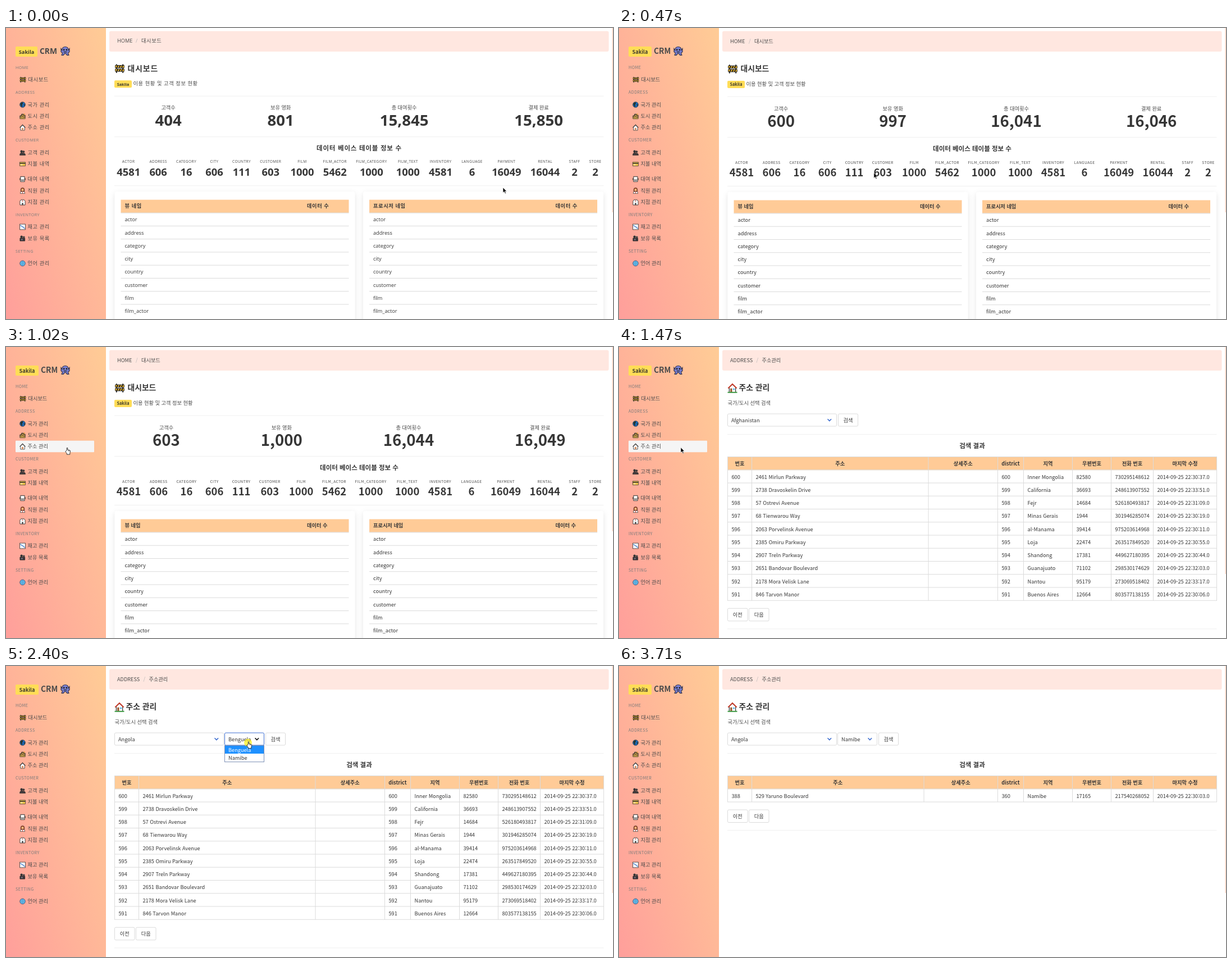
Write an HTML page that moves like this. It is 1081 px wide and 518 px high and loops after 3770 ms.

```html
<!DOCTYPE html>
<html lang="ko">
<head>
<meta charset="utf-8">
<title>Sakila CRM</title>
<style>
html, body { margin: 0; width: 100%; height: 100%; overflow: hidden; background: #fff; }
#side { position: absolute; left: 0; top: 0; width: 177.5px; height: 518px; background: linear-gradient(75deg, #ff9f9b, #ffcc96); }
svg { position: absolute; left: 0; top: 0; font: 9.2px 'Noto Sans CJK KR', 'Noto Sans CJK', sans-serif; }
.early { font-family: 'Open Sans', 'Noto Sans CJK KR', sans-serif; }
.early .ko { letter-spacing: .07em; }
.card { filter: drop-shadow(0 3px 5px rgba(10, 10, 10, .1)); }
.level { display: flex; text-align: center; color: #363636; white-space: nowrap; }
.level > div { flex: 1 0 auto; }
.level > div + div { margin-left: 7.9px; }
.level b, .level i { display: block; }
.level i { font-style: normal; color: #4a4a4a; line-height: 14px; }
.level b { font-size: 27.6px; line-height: 29.5px; }
.small i { font-size: 6.57px; letter-spacing: .4px; line-height: 10px; }
.small b { font-size: 18.4px; line-height: 25.2px; }
</style>
</head>
<body>
<div id="side"></div>
<svg id="stage" width="1081" height="518" viewBox="0 0 1081 518"></svg>
<script>
const LOOP = 3770, ORANGE = '#ffcb97', GREY = '#dbdbdb', BLUE = '#3f6fd1';
const stage = document.getElementById('stage');
const find = id => document.getElementById(id);

// y is the visual middle of the text
function text(x, y, str, o = {}) {
  const size = o.size || 9.2;
  return `<text x="${x}" y="${y + size * .36}" font-size="${size}" fill="${o.fill || '#4a4a4a'}"
    font-weight="${o.weight || 400}" text-anchor="${o.anchor || 'start'}"
    ${o.spacing ? `letter-spacing="${o.spacing}"` : ''}
    class="${/[가-힣]/.test(str) ? 'ko' : ''}">${str}</text>`;
}
const bold = (x, y, str, size, anchor) => text(x, y, str, { size, anchor, weight: 700, fill: '#363636' });
const rect = (x, y, w, h, fill, more = '') => `<rect x="${x}" y="${y}" width="${w}" height="${h}" fill="${fill}" ${more}/>`;
const path = (d, stroke, width = 1, fill = 'none') => `<path d="${d}" stroke="${stroke}" stroke-width="${width}" fill="${fill}"/>`;
const rule = (y, x = 193, end = 1064.5, color = '#f0f0f0') => path(`M${x} ${y}H${end}`, color);
const group = (id, body, more = '') => `<g id="${id}" ${more}>${body}</g>`;

// Icons live in a 12 by 12 box
const house = (wall, roof, extra = '') =>
  path('M2 5v6.5h8V5L6 1.5z', '#222', .8, wall) + path('M.6 6.4 6 1l5.4 5.4', roof, 1.4) + extra;
const icons = {
  barrier: path('M2 .5v11M10 .5v11', '#333', 1.5) + path('M.5 2h11v3H.5zM.5 6.5h11v3H.5z', '#222', .7, '#ffc52e') +
    path('M2 5l2-3M5 5l2-3M8 5l2-3M2 9.5l2-3M5 9.5l2-3M8 9.5l2-3', '#222', 1.3),
  globe: '<circle cx="6" cy="6" r="5.3" fill="#1c6fc4" stroke="#222" stroke-width=".8"/>' +
    path('M2 3l4-2 1 3-2 2 1 3-2 1-2-4zM8 5l3 1-2 3z', 'none', 0, '#26352f'),
  city: path('M1 11V5h3V2h4v2h3v7z', '#222', 1, '#8b6b3c') + path('M2 7h2M5 4h2M8 6h2M5 8h2M1 10h10', '#f5cd52', 1.1) +
    '<circle cx="9.5" cy="2" r="1.3" fill="#e8a33d"/>',
  house: house('#fff', '#333', rect(4.5, 7, 3, 4, '#d58b5b')),
  home: house('#fff', '#c9402f', rect(3.3, 6.5, 2.3, 5, '#9a5b32') + rect(6.8, 6.5, 2, 2, '#58b3e8') +
    path('M0 11.5h12', '#3f9d45', 1.4)),
  people: '<circle cx="4" cy="3.5" r="2.4" fill="#333"/><circle cx="8" cy="4.2" r="2.2" fill="#443b3a"/>' +
    path('M.5 11q0-5 4-5 2 0 3 1 4-.5 4 4z', '#222', .6, '#40393a'),
  card: path('M.5 2.5h11v7.5H.5z', '#333', .8, '#f4c84b') + rect(.5, 4, 11, 1.7, '#333') + rect(2, 7.3, 4, 1, '#fff'),
  rental: path('M2 1h8v10H2z', '#333', 1, '#e9e5e2') + path('M1 4v4M11 4v4M3 8h6', '#333', 1.3) + rect(3.5, 2.5, 5, 3, '#fff'),
  staff: path('M2.5 8V4q0-3.5 3.5-3.5T9.5 4v4z', '#222', .7, '#b8562c') + '<circle cx="6" cy="4.5" r="2" fill="#f8ca8e"/>' +
    path('M1.5 11.5q0-4 4.5-4t4.5 4z', '#222', .7, '#fff') + rect(5.3, 8, 1.4, 3, '#d54b3e'),
  store: path('M1 11.5V4l2-2.5h6L11 4v7.5z', '#222', .9, '#fff') + rect(4.5, 7.5, 3, 4, '#555') + rect(5, 3, 2, 2, '#d85d50'),
  chart: rect(.7, .7, 10.6, 10.6, '#fff', 'stroke="#333" stroke-width=".9"') +
    path('M1 4h10M1 8h10M4 1v10M8 1v10', '#bcd', .4) + path('M1.5 3l3 2 2 1 4 3.5', '#3272c9', 1.2),
  camera: '<circle cx="4" cy="3" r="2.4" fill="#333"/><circle cx="8.5" cy="3.5" r="2" fill="#444"/>' +
    path('M1 5.5h9.5v5.5H1z', '#222', .8, '#38343a') + rect(3, 7, 3.5, 2.5, '#77707a'),
  net: '<circle cx="6" cy="6" r="5.2" fill="#6bc8f4" stroke="#236" stroke-width=".8"/>' +
    path('M1 6h10M6 1v10M2 3.5q4 2 8 0M2 8.5q4-2 8 0M6 1q-5 5 0 10M6 1q5 5 0 10', '#4889bd', .5),
  monster: path('M2 5q0-4.3 4-4.3T10 5l1.3-2v4L9.5 8.5l1 2.7H8.2L7 9.3H5l-1.2 1.9H1.5l1-2.7L.7 7V3z', '#30304a', .8, '#7b83d6') +
    rect(3.5, 3.5, 1.7, 2, '#222') + rect(6.8, 3.5, 1.7, 2, '#222') + path('M4 7.2h4', '#222', 1)
};
const icon = (name, x, y, size = 11) =>
  `<g transform="translate(${x} ${y - size / 2}) scale(${size / 12})">${icons[name]}</g>`;

const menu = [
  ['HOME', 70], ['ADDRESS', 114.5], ['CUSTOMER', 199.5], ['INVENTORY', 332], ['SETTING', 397]
];
const links = [
  ['barrier', '대시보드', 92], ['globe', '국가 관리', 136.5], ['city', '도시 관리', 157], ['house', '주소 관리', 177],
  ['people', '고객 관리', 222], ['card', '지불 내역', 242], ['rental', '대여 내역', 269], ['staff', '직원 관리', 289.5],
  ['store', '지점 관리', 310], ['chart', '재고 관리', 354], ['camera', '보유 목록', 374.5], ['net', '언어 관리', 419]
];
const badge = (x, y, w, h, size) => rect(x, y, w, h, '#ffdd57', 'rx="2"') +
  text(x + w / 2, y + h / 2 + .3, 'Sakila', { size, anchor: 'middle', weight: 700, fill: '#3d3a2c' });
const brand = (w, x) => badge(17, 33, w, 18, 9.2) + text(x, 41, 'CRM', { size: 13.8, weight: 700 });
const sidebar = rect(17, 0, 140, 20.5, '#f5f5f5', 'id="hover" rx="1"') +
  group('brandEarly', brand(39, 60)) + group('brandLate', brand(41, 62)) + icon('monster', 97, 41, 17) +
  menu.map(([s, y]) => text(17, y, s, { size: 7.2, spacing: .45, fill: '#7a7a7a' })).join('') +
  links.map(([i, s, y]) => icon(i, i === 'barrier' ? 24.5 : 24, y) + text(i === 'barrier' ? 39.5 : 38.5, y, s)).join('');

const crumbs = (a, b, slash, x) => text(198, 24, a) + text(slash, 24, '/', { fill: '#b5b5b5' }) + text(x, 24, b);
const level = (y, kind, items) => `<foreignObject x="193" y="${y}" width="871.5" height="50"><div class="level ${kind}">${
  items.map(([s, n]) => `<div><i>${s}</i><b>${n}</b></div>`).join('')}</div></foreignObject>`;

const totals = [['고객수', 603], ['보유 영화', 1000], ['총 대여횟수', 16044], ['결제 완료', 16049]];
const tables = [['ACTOR', 4581], ['ADDRESS', 606], ['CATEGORY', 16], ['CITY', 606], ['COUNTRY', 111], ['CUSTOMER', 603],
  ['FILM', 1000], ['FILM_ACTOR', 5462], ['FILM_CATEGORY', 1000], ['FILM_TEXT', 1000], ['INVENTORY', 4581], ['LANGUAGE', 6],
  ['PAYMENT', 16049], ['RENTAL', 16044], ['STAFF', 2], ['STORE', 2]];
const names = ['actor', 'address', 'category', 'city', 'country', 'customer', 'film', 'film_actor'];

const card = (x, title) => rect(x, 292, 428, 260, '#fff', 'rx="4" class="card"') +
  rect(x + 11, 306.5, 406, 23.2, ORANGE) + bold(x + 18, 318, title) + bold(x + 342.5, 318, '데이터 수') +
  names.map((s, i) => text(x + 18, 342 + 23.25 * i, s, { fill: '#363636' }) +
    rule(330 + 23.25 * i, x + 11, x + 417, GREY)).join('');

const dashboard = crumbs('HOME', '대시보드', 231, 241) + icon('barrier', 194, 73, 17) + bold(216.5, 72.5, '대시보드', 13.8) +
  badge(193, 94, 31, 13, 7.2) + text(226.5, 100, '이용 현황 및 고객 정보 현황') +
  rule(122) + level(135.5, 'totals', totals) + rule(194.5) + bold(629, 215, '데이터 베이스 테이블 정보 수', 11.5, 'middle') +
  level(233.6, 'small', tables) + rule(281.5) + card(193.5, '뷰 네임') + card(636, '프로시저 네임');

const heads = ['번호', '주소', '상세주소', 'district', '지역', '우편번호', '전화 번호', '마지막 수정'];
const addresses = `2461 Mirlun Parkway|Inner Mongolia|82580|730295148612|30:37
2738 Dravoskelin Drive|California|36693|248613907552|33:51
57 Ostrevi Avenue|Fejr|14684|526180493817|31:09
68 Tienwarou Way|Minas Gerais|1944|301946285074|30:19
2063 Porvelinsk Avenue|al-Manama|39414|975203614968|30:11
2385 Omiru Parkway|Loja|22474|263517849520|30:55
2907 Treln Parkway|Shandong|17381|449627180395|30:44
2651 Bandovar Boulevard|Guanajuato|71102|298530174629|32:03
2178 Mora Velisk Lane|Nantou|95179|273069518402|33:17
846 Tarvon Manor|Buenos Aires|12664|803577138155|30:06`.split('\n');
const cells = (line, id, district) => {
  const [street, area, zip, phone, time] = line.split('|');
  return [id, street, '', district, area, zip, phone, `2014-09-25 22:${time}.0`];
};
const firstRows = addresses.map((line, i) => cells(line, 600 - i, 600 - i));
const foundRows = [cells('529 Yaruno Boulevard|Namibe|17165|217540268052|30:03', 388, 360)];

function table(rows, split) {
  const cols = [193.5, 236.5, split, 674.5, 720.5, 807.5, 876.5, 951.5, 1064.5];
  const top = 195.5, step = 23.25, end = top + step * (rows.length + 1), foot = end + 14;
  const button = (x, s) => rect(x, foot, 35.5, 22.5, '#fff', `stroke="${GREY}" rx="2"`) +
    text(x + 17.7, foot + 11.5, s, { anchor: 'middle', fill: '#363636' });
  return rect(193.5, top, 871, step + .5, ORANGE) +
    cols.map(x => path(`M${x} ${top}V${end}`, GREY)).join('') +
    [...rows, 0, 0].map((_, i) => rule(top + step * i, 193, 1065, GREY)).join('') +
    heads.map((s, i) => bold((cols[i] + cols[i + 1]) / 2, 208, s, 9.2, 'middle')).join('') +
    rows.map((row, r) => row.map((s, i) => text(cols[i] + 7, 231.2 + step * r, String(s), { fill: '#363636' })).join('')).join('') +
    button(193.5, '이전') + button(231.5, '다음') + rule(foot + 36.5);
}
const addressPage = crumbs('ADDRESS', '주소관리', 244.5, 254.5) + icon('home', 193.5, 73, 17) + bold(213.5, 72.5, '주소 관리', 13.8) +
  text(193.5, 99.5, '국가/도시 선택 검색') + rule(155.5) + bold(629, 176, '검색 결과', 11.5, 'middle') +
  group('first', table(firstRows, 551)) + group('found', table(foundRows, 543)) + group('controls', '');

stage.innerHTML = sidebar + rect(184, 5.5, 889.5, 36.5, '#ffe7e0', 'rx="3"') +
  group('dashboard', dashboard) + group('address', addressPage) + rect(1079.5, 0, 1.5, 404, '#fcd8c6', 'id="bar"') +
  '<circle id="ring" r="7" fill="#fff000" fill-opacity=".65"/>' +
  group('arrow', path('M0 0v9.3l2.2-2 1.6 3.6 1.5-.7-1.6-3.4h2.9z', '#fff', .6, '#000')) +
  group('hand', path('M-.8 5V.8Q0-.4.8.8V4l4 1q1 .3.8 1.6L4.8 10v2.2H-.6V10.6L-3.2 7.3q0-1.2 1.2-.8z', '#222', .9, '#fff') +
    path('M2.2 4.5v2.2M3.8 5v2', '#222', .6));

const countries = ('Afghanistan,Algeria,American Samoa,Angola,Anguilla,Argentina,Armenia,Australia,Austria,Azerbaijan,Bahrain,' +
  'Bangladesh,Belarus,Bolivia,Brazil,Brunei,Bulgaria,Cambodia,Cameroon,Canada').split(',');
const cities = ['Benguela', 'Namibe'];

const box = (x, w, focus) => rect(x, 119, w, 22, '#fff', `stroke="${focus ? BLUE : GREY}" rx="2"`);
const select = (x, w, label, focus, open) => box(x, w, focus) + text(x + 6.5, 130.5, label, { fill: '#363636' }) +
  path(`M${x + w - 16} 128.3l3.3 3.3 3.3-3.3`, open ? '#111' : BLUE, 1.6);
function list(x, w, items, picked, inner) {
  return rect(x, 141.5, w, items.length * 14.2 + .8, '#fff', 'stroke="#7b8fb5"') +
    rect(x + .5, 142 + picked * 14.2, inner, 14, '#1e90ff') +
    items.map((s, i) => text(x + 6.5, 149.3 + 14.2 * i, s, { fill: i === picked ? '#fff' : '#363636' })).join('');
}
const scrollbar = rect(378, 142, 9, 283, '#f1f1f1') + rect(378.7, 151.5, 7.6, 47.5, '#c1c1c1') +
  path('M380 148l2.5-2.5 2.5 2.5z', 'none', 0, '#8a8a8a') + path('M380 418l2.5 2.5 2.5-2.5z', 'none', 0, '#444');

// Time, pointer position, hand or arrow until the next key
const keys = [
  [0, 886, 284, 0], [470, 454, 258, 0], [520, 448, 254, 0], [540, 430, 249, 0], [760, 157, 160, 1], [860, 105, 138, 1],
  [960, 107, 170, 1], [1020, 109, 179, 1], [1310, 109, 179, 1], [1470, 109, 179, 0], [1660, 300, 139, 1], [1760, 344, 125.5, 1],
  [1920, 344, 125.5, 1], [2050, 338, 189, 1], [2130, 338, 189, 0], [2300, 425, 140, 1], [2380, 432, 134.5, 1],
  [2490, 432, 134.5, 1], [2580, 432, 158, 1], [2740, 432, 158, 0], [2860, 472, 146, 0], [2900, 479, 134, 1],
  [2920, 480, 129, 1], [3270, 480, 129, 0], [3700, 540, 530, 0]
];
const clicks = [[1310, 1470], [1780, 1920], [2050, 2130], [2380, 2490], [2740, 2800], [3080, 3270]];
const between = (t, a, b) => t >= a && t < b;

function pointer(t) {
  const i = Math.max(1, keys.findIndex(k => k[0] > t));
  const last = keys[keys.length - 1];
  if (t >= last[0]) return { x: last[1], y: last[2], hand: 0 };
  const [t0, x0, y0, hand] = keys[i - 1], [t1, x1, y1] = keys[i], p = (t - t0) / (t1 - t0);
  return { x: x0 + (x1 - x0) * p, y: y0 + (y1 - y0) * p, hand };
}
function show(id, on) { find(id).style.display = on ? '' : 'none'; }

function controls(t, y) {
  const listOpen = between(t, 1790, 2080), cityOpen = between(t, 2380, 2740), hasCity = t >= 2120;
  const row = n => Math.max(0, Math.min(n - 1, Math.floor((y - 142) / 14.2)));
  const x = hasCity ? 462.5 : 390.5;
  return select(193.5, 194, countries[t < 2080 ? 0 : 3], between(t, 1780, 2380), listOpen) +
    (hasCity ? select(389.5, 70, cities[t < 2740 ? 0 : 1], between(t, 2380, 3080), cityOpen) : '') +
    box(x, 35, between(t, 3080, 3270)) + text(x + 17.5, 130.5, '검색', { anchor: 'middle', fill: '#363636' }) +
    (listOpen ? list(193.5, 194, countries, row(20), 184) + scrollbar : '') +
    (cityOpen ? list(389.5, 70, cities, row(2), 69) : '');
}

const counters = [...document.querySelectorAll('.totals b')];
function draw(now) {
  const t = now % LOOP, early = t < 100, home = t < 1470;
  const { x, y, hand } = pointer(t);
  stage.classList.toggle('early', early);
  show('brandEarly', early);
  show('brandLate', !early);
  show('dashboard', home);
  show('address', !home);
  show('first', t < 3270);
  show('found', t >= 3270);
  find('dashboard').setAttribute('transform', `translate(0 ${early ? -.8 : 0})`);
  find('bar').setAttribute('height', home ? 328 : 404);

  const gap = 200 * Math.exp(-t / 111.8), left = gap < 1 ? 0 : Math.ceil(gap);
  counters.forEach((el, i) => { el.textContent = (totals[i][1] - left).toLocaleString('en-US'); });
  if (!home) find('controls').innerHTML = controls(t, y);

  const over = x < 157 && links.find(l => Math.abs(l[2] - y) < 10.2);
  show('hover', over);
  if (over) find('hover').setAttribute('y', over[2] - 10.2);
  show('hand', hand);
  show('arrow', !hand);
  find(hand ? 'hand' : 'arrow').setAttribute('transform', `translate(${x} ${y})`);
  show('ring', clicks.some(([a, b]) => between(t, a, b)));
  find('ring').setAttribute('transform', `translate(${x - 1} ${y + 2})`);
}
const start = performance.now();
function tick() {
  draw(performance.now() - start);
  requestAnimationFrame(tick);
}
tick();
</script>
</body>
</html>
```
